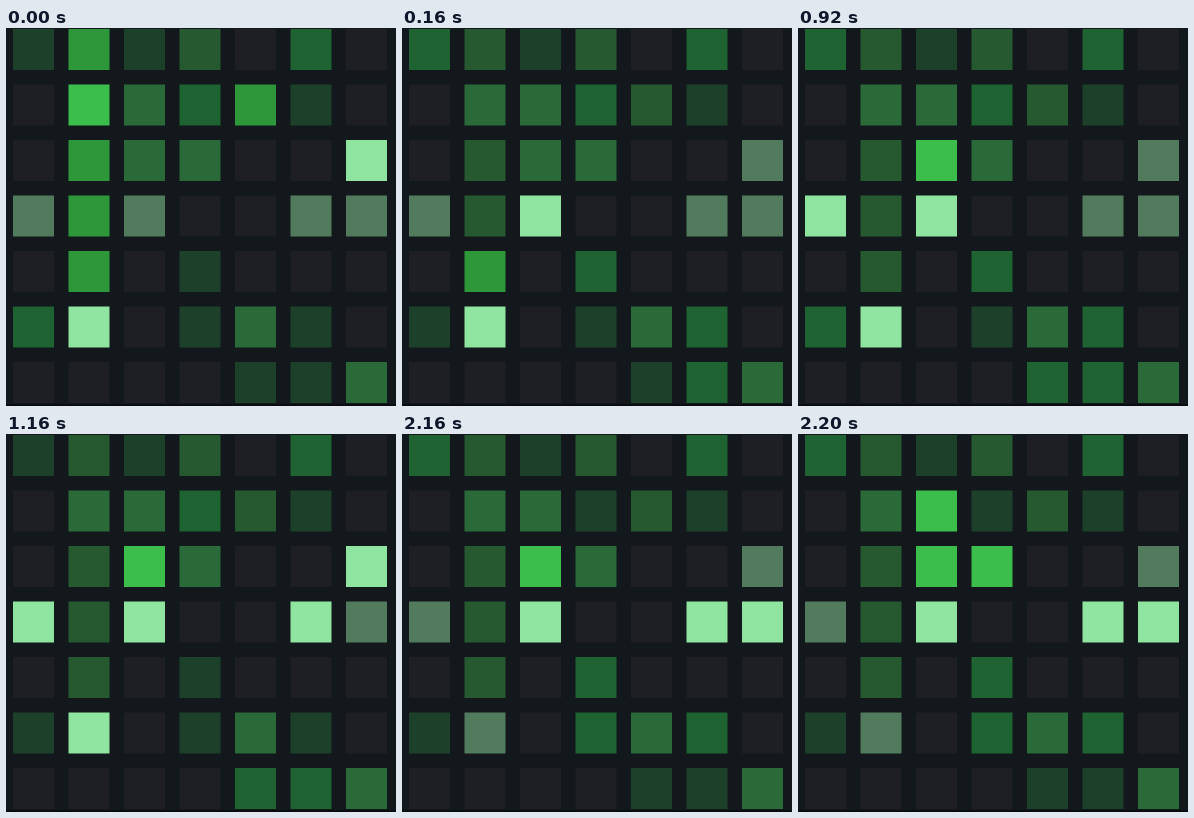
Write an HTML page that moves like this. It is 390 px wide and 378 px high and loops after 2280 ms.

```html
<!DOCTYPE html>
<html lang="en">
<head>
<meta charset="utf-8">
<title>Contribution grid</title>
<style>
  html, body { margin: 0; width: 100%; height: 100%; overflow: hidden; background: #12181c; }
  svg { display: block; width: 390px; height: 378px; }
</style>
</head>
<body>
<svg id="grid" viewBox="0 0 390 378"></svg>
<script>
const LOOP = 2280, PITCH = 55.5, SIZE = 41;
const colors = {
  '.': '#1d1f24', a: '#1d402b', b: '#1e6331', c: '#275930', d: '#2a6a39',
  e: '#2d9739', f: '#3cbe4c', g: '#527a5c', h: '#8fe5a0'
};
const start = ['aeac.b.', '.fdbea.', '.edd..h', 'geg..gg', '.e.a...', 'bh.ada.', '....aad'];

// Each change is a colour key followed by row and column.
const steps = [
  [160, 'b00 c01 d11 c14 c21 g26 c31 h32 b43 a50 b55 b65'],
  [680, 'h30 b50 b64'],
  [920, 'f22 c41'],
  [1160, 'a00 h26 h35 a43 a50 a55'],
  [1680, 'h36 b50'],
  [2160, 'b00 a13 g26 g30 b43 a50 g51 b53 b55 a64 a65'],
  [2200, 'f12 f23']
].map(([time, list]) => [time, list.split(' ')]);

const svg = document.getElementById('grid');

function addRect(x, y, width, height, fill) {
  const rect = document.createElementNS('http://www.w3.org/2000/svg', 'rect');
  Object.entries({ x, y, width, height, fill }).forEach(([k, v]) => rect.setAttribute(k, v));
  return svg.appendChild(rect);
}

addRect(0, 376, 390, 2, '#0a0d10');
const cells = start.map((row, r) => [...row].map((key, c) =>
  addRect(7 + c * PITCH, 1 + r * PITCH, SIZE, SIZE, colors[key])));

function stateAt(time) {
  const state = start.map(row => [...row]);
  for (const [at, list] of steps) {
    if (time < at) break;
    for (const [key, r, c] of list) state[r][c] = key;
  }
  return state;
}

const origin = performance.now();

function draw() {
  const state = stateAt((performance.now() - origin) % LOOP);
  cells.forEach((row, r) => row.forEach((cell, c) =>
    cell.setAttribute('fill', colors[state[r][c]])));
  requestAnimationFrame(draw);
}
draw();
</script>
</body>
</html>
```
